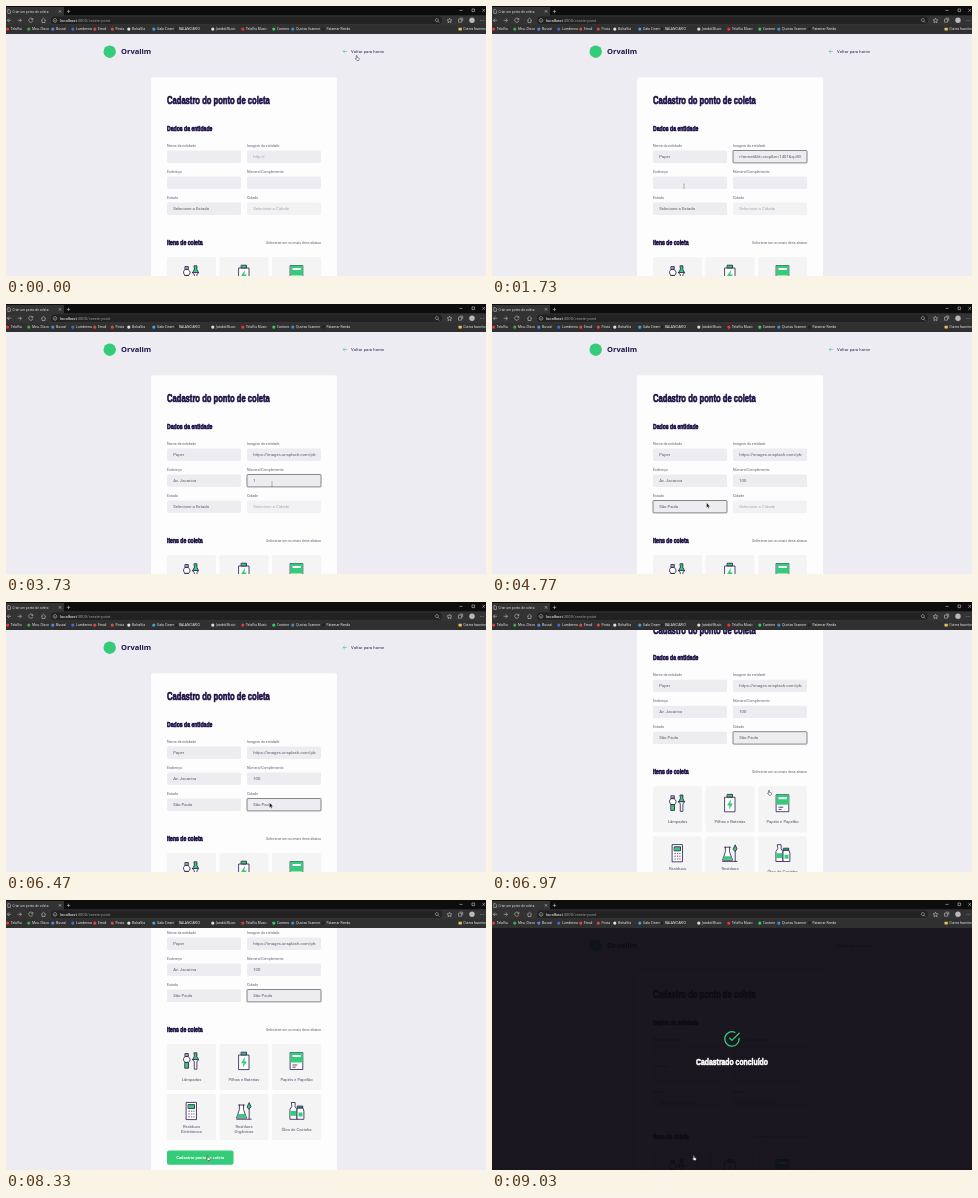
Recreate the animation shown at these times as an HTML page. Size 480 px wide and 270 px high, loop 9.06 s.

```html
<!DOCTYPE html>
<html lang="pt-BR">
<head>
<meta charset="utf-8">
<title>Criar um ponto de coleta</title>
<style>
  html, body { margin: 0; width: 100%; height: 100%; overflow: hidden; background: #ececf2; }
  svg { display: block; width: 100vw; height: 100vh; }
  text { font-family: Roboto, "Liberation Sans", sans-serif; white-space: pre; }
  .head { font-family: "Liberation Sans", Arial, sans-serif; font-weight: 700; stroke-width: .7; stroke-linejoin: round; }
  .brand { font-family: "Open Sans", "Noto Sans", sans-serif; font-weight: 700; }
  .ui { font-family: "Open Sans", "Noto Sans", sans-serif; font-weight: 500; }
  .line { fill: none; stroke: #c0c0c0; stroke-width: .6; }
  .ink { stroke: #261747; stroke-width: .8; stroke-linejoin: round; stroke-linecap: round; fill: none; }
  .green { fill: #34cb79; }
  .pale { fill: #fff; }
</style>
</head>
<body>
<svg id="stage" viewBox="0 0 480 270" preserveAspectRatio="none">
  <rect width="480" height="270" fill="#ececf2"/>
  <g id="page"></g>
  <g id="done">
    <rect y="27" width="480" height="243" fill="#0e0a14" opacity=".945"/>
    <g transform="translate(231.3 130.3) scale(.72)" fill="none" stroke="#34cb79" stroke-width="1.8" stroke-linecap="round" stroke-linejoin="round">
      <path d="M22 11.1V12a10 10 0 1 1-5.93-9.14"/>
      <path d="M22 4L12 14 9 11"/>
    </g>
  </g>
  <g id="chrome"></g>
  <g id="cursor"></g>
</svg>
<script>
const LOOP = 9060, SCROLL = 107, SENT = 8600;
const NAVY = "#1f1147";
const NS = "http://www.w3.org/2000/svg";
const $ = id => document.getElementById(id);

function add(parent, tag, attrs, content) {
  const el = document.createElementNS(NS, tag);
  for (const k in attrs) el.setAttribute(k, attrs[k]);
  if (content) el.textContent = content;
  parent.append(el);
  return el;
}
const rect = (p, x, y, width, height, fill, rx = 0) =>
  add(p, "rect", { x, y, width, height, fill, rx });
const dot = (p, cx, cy, r, fill) => add(p, "circle", { cx, cy, r, fill });
const line = (p, d) => add(p, "path", { d, class: "line" });
const label = (p, str, x, y, size, fill, more = {}) =>
  add(p, "text", { x, y, "font-size": size, fill, ...more }, str);

// Condensed display face: one fixed narrowing for every heading.
const heading = (p, str, x, y, size, fill, anchor = "start") =>
  add(p, "text", {
    class: "head", transform: `translate(${x} ${y}) scale(.7 1)`,
    "font-size": size, fill, stroke: fill, "text-anchor": anchor
  }, str);

// Browser frame
function buildChrome(p) {
  rect(p, 0, 0, 480, 28, "#303030");
  rect(p, 0, 0, 480, 9.5, "#0d0d0d");
  rect(p, 0, 1, 58, 9, "#333");
  rect(p, 0, 9.5, 480, 9.5, "#333");
  rect(p, 45, 10.6, 391, 7.4, "#222", 3.6);
  line(p, "M1.8 3.6h1.6l1 1v2.8H1.8z");
  label(p, "Criar um ponto de coleta", 6.5, 6.7, 3.1, "#eee", { class: "ui" });
  line(p, "M52.8 4.2l2.4 2.4m0-2.4l-2.4 2.4M60.8 5.4h3.4m-1.7-1.7v3.4");
  line(p, "M453.5 4.4h3M466 3h2.6v2.6H466zM476.3 3l2.7 2.7m0-2.7l-2.7 2.7");
  line(p, "M5.2 14.3H1.4m1.7-1.8l-1.8 1.8 1.8 1.8");
  line(p, "M11.6 14.3h3.8m-1.7-1.8l1.8 1.8-1.8 1.8");
  line(p, "M26.6 13a2.1 2.1 0 1 0 .3 1.6m0-2.6v1.5h-1.5");
  line(p, "M35.2 14.4l2.3-2.1 2.3 2.1m-3.8-.5v2.6h3v-2.6");
  line(p, "M49 12.6a1.8 1.8 0 1 0 .01 0M49 14v1.4");
  const url = label(p, "", 54, 15.9, 4.1, "#999");
  add(url, "tspan", { fill: "#fff" }, "localhost");
  add(url, "tspan", {}, ":3000/create-point");
  line(p, "M430.8 12.6a1.5 1.5 0 1 0 .01 0M431.9 15.2l1.4 1.4");
  line(p, "M443.5 12.2l.7 1.5 1.7.2-1.3 1.1.4 1.7-1.5-.9-1.5.9.4-1.7-1.3-1.1 1.7-.2z");
  line(p, "M452.5 13.2h3v3h-3zM453.7 12.1h3v3");
  dot(p, 466, 14.3, 2.7, "#b9b9b9");
  for (const x of [474.3, 476, 477.7]) dot(p, x, 14.3, .4, "#bbb");

  const marks = [
    ["TelaViu", 4.8, "#e33"], ["Meu. Disco", 26, "#3da65a"], ["Buscaí", 50, "#4f86ea"],
    ["Lumbrena", 70, "#3b6fd4"], ["Email", 92, "#d64b3f"], ["Posta", 109.5, "#d64b3f"],
    ["BolsaVia", 126, "#dfe5ea"], ["Gala Cinema", 151, "#35a7dd"], ["BALANCIARIO", 173, "#222"],
    ["Jatobá Music", 210, "#ddd"], ["TelaViu Music", 240, "#e33"], ["Cantoro", 271, "#2fce62"],
    ["Quotas Scanner", 290, "#3d8bc9"], ["Patamar Renda", 320.5, "#222"]
  ];
  for (const [name, x, color] of marks) {
    dot(p, x - 3.2, 23.1, 1.6, color);
    label(p, name, x, 24.3, 3.3, "#fff", { class: "ui" });
  }
  rect(p, 452.5, 21.8, 3.3, 2.6, "#e5c15c", .3);
  label(p, "Outros favoritos", 457.3, 24.3, 3.1, "#fff", { class: "ui" });
}

// Form page
const fields = [
  ["name", "Nome da entidade", 161, 144.5],
  ["image", "Imagem da entidade", 241, 144.5],
  ["street", "Endereço", 161, 170.5],
  ["number", "Número/Complemento", 241, 170.5],
  ["state", "Estado", 161, 196.5],
  ["city", "Cidade", 241, 196.5]
];
const ui = {};

function buildField(p, defs, [id, title, x, y]) {
  label(p, title, x, y - 3.7, 3.57, "#5c5c70");
  const box = rect(p, x, y, 74, 12.4, "#ececf1", 1.6);
  const clip = add(defs, "clipPath", { id: "clip-" + id });
  rect(clip, x + 6, y, 62.5, 12.4);
  const g = add(p, "g", { "clip-path": `url(#clip-${id})` });
  ui[id] = { box, x, text: label(g, "", x + 6.2, y + 7.8, 4.25) };
}

const icons = [
  `<path class="ink" d="M-6.2-7.5h3v3h-3zM-5.8-6h2.2"/>
   <path class="ink pale" d="M-6.2-4.5h3l1.8 2.5q.2 2.6-1.8 3.4h-3Q-8.2.6-8-2z"/>
   <path class="ink green" d="M-6.4 1.4h3.4v5.8h-3.4z"/>
   <path class="ink green" d="M2.8-8.2h2.6v3.6L7-1.4H1.2l1.6-3.2z"/>
   <path class="ink pale" d="M1.2-1.4H7L5.4.8v7.4H2.8V.8z"/>`,
  `<path class="ink pale" d="M-5-6H5V8.6H-5z"/><path class="ink green" d="M-2.5-8.8h5V-6h-5z"/>
   <path class="green" d="M1-4.2L-3 2.2h2.5L-1.2 6.6 3 .4H.4z"/>`,
  `<path class="ink pale" d="M-6-8.5H6.3V8.5H-6z"/><path class="green" d="M-6-8.5H6.3V1.5H-6z"/>
   <path class="pale" d="M-4-6H4.3v2H-4z"/><path class="ink" d="M-3.6 4h4M-3.6 6.2h2.4"/>`,
  `<path class="ink pale" d="M-5-8.6H5V8.6H-5z"/><path class="ink green" d="M-3-6.4h6v4h-6z"/>
   <path class="ink" d="M-2.7.2h.6M0 .2h.4M2.3.2h.4M-2.7 3h.6M0 3h.4M2.3 3h.4M-2.7 5.8h.6M0 5.8h.4M2.3 5.8h.4"/>`,
  `<path class="ink pale" d="M-4.6-6v4.4L-7.4 7H2.5L-.5-1.6V-6M-5.5-6H.4"/><path class="green" d="M-6 3h7l1 3.6h-9z"/>
   <path class="ink green" d="M3.2-4.3L5.2-8.4 7-4.3 5.2-2z"/><path class="ink" d="M5.2-2v10M-7.4 8.2h14.6"/>`,
  `<path class="ink pale" d="M-4.8-8.5h3.4v4l1.8 3v9.8h-7V-1.5l1.8-3z"/><path class="green" d="M-6.2 0h6.3v4.8h-6.3z"/>
   <path class="ink green" d="M1.2-5h5v2h-5z"/><path class="ink pale" d="M1-2.8h5.6L7.4 0v8.3H.5V0z"/><path class="green" d="M2 1.5h4v4H2z"/>`
];
const items = [["Lâmpadas"], ["Pilhas e Baterias"], ["Papéis e Papelão"],
  ["Resíduos", "Eletrônicos"], ["Resíduos", "Orgânicos"], ["Óleo de Cozinha"]];

function buildPage(p) {
  const defs = add(p, "defs", {});
  dot(p, 103.7, 45.7, 6.2, "#34cb79");
  label(p, "Orvalim", 115, 48.2, 7.5, NAVY, { class: "brand" });
  label(p, "Voltar para home", 345, 46.8, 4.2, "#322153", { "letter-spacing": .08 });
  add(p, "path", { d: "M340.8 45.5h-3.6m1.6-1.7l-1.7 1.7 1.7 1.7", fill: "none", stroke: "#34cb79", "stroke-width": .6 });
  rect(p, 145, 71.2, 186, 330, "#fdfdfd", 2);
  heading(p, "Cadastro do ponto de coleta", 161, 98.4, 10.9, NAVY);
  heading(p, "Dados da entidade", 161, 125, 7.3, NAVY);
  for (const f of fields) buildField(p, defs, f);
  ui.focus = add(p, "rect", { width: 74, height: 12.4, rx: .8, fill: "none", stroke: "#4a4a50", "stroke-width": .65 });

  heading(p, "Itens de coleta", 161, 239, 7.3, NAVY);
  label(p, "Selecione um ou mais itens abaixo", 315, 237.6, 3.57, "#5c5c70", { "text-anchor": "end" });
  items.forEach((words, i) => {
    const x = 161 + i % 3 * 52.5, y = 251 + Math.floor(i / 3) * 50;
    rect(p, x, y, 49, 46, "#f4f4f5", 2);
    add(p, "g", { transform: `translate(${x + 24.5} ${y + 17})` }).innerHTML = icons[i];
    words.forEach((w, row) => {
      const up = words.length > 1 ? 2.7 : 0;
      label(p, w, x + 24.5, y + 36.7 - up + row * 5.4, 4.2, "#55506a", { "text-anchor": "middle" });
    });
  });
  rect(p, 161, 357.4, 66.5, 14.4, "#34cb79", 2);
  label(p, "Cadastrar ponto de coleta", 194.2, 366, 4.15, "#fff", { "font-weight": 700, "text-anchor": "middle" });
}

// Timeline
const focusAt = [[0, null], [320, "name"], [1250, "image"], [1850, "street"],
  [3300, "number"], [4150, "state"], [5250, "city"]];
const pathAt = [
  [0, 351, 52, "hand"], [320, 200, 152, "beam"], [950, 200, 152, "beam"], [1250, 275, 152, "beam"],
  [1500, 275, 152, "beam"], [1730, 192, 180, "beam"], [2950, 192, 180, "beam"], [3300, 266, 180, "beam"],
  [3950, 266, 180, "beam"], [4150, 215, 203, "arrow"], [4770, 215, 201, "arrow"], [5200, 264, 203, "arrow"],
  [6470, 264, 203, "arrow"], [7050, 278, 190, "hand"], [7500, 278, 190, "hand"], [8250, 202, 258, "hand"],
  [LOOP, 202, 258, "hand"]
];
const shapes = {
  arrow: '<path d="M-.5-2.2v5l1.2-1 .8 1.6.8-.4-.8-1.6h1.5z" fill="#111" stroke="#fff" stroke-width=".35"/>',
  hand: '<path d="M-.7-2.2q.7-.6 1 .2v1.6l1.7.5q.5.4.1 1.7l-.5.8H0L-1.7.7q0-.8 1-.2z" fill="#fff" stroke="#222" stroke-width=".5"/>',
  beam: '<path d="M-.7-2h1.4M0-2v4M-.7 2H.7" fill="none" stroke="#666" stroke-width=".4"/>'
};

const ease = u => u * u * (3 - 2 * u);
const span = (t, a, b) => Math.min(1, Math.max(0, (t - a) / (b - a)));
const typed = (str, t, a, b) => str.slice(0, Math.floor(span(t, a, b) * str.length));
const latest = (rows, t) => rows.filter(r => r[0] <= t).pop();

function setField(id, value, hint = "") {
  const { text } = ui[id];
  text.textContent = value || hint;
  text.setAttribute("fill", value || id === "state" ? "#5a5a68" : "#a4a4b0");
}

function drawCursor(t) {
  const a = latest(pathAt, t), b = pathAt[pathAt.indexOf(a) + 1] || a;
  const u = a === b ? 0 : ease(span(t, a[0], b[0]));
  const x = a[1] + (b[1] - a[1]) * u, y = a[2] + (b[2] - a[2]) * u;
  const kind = u > .6 ? b[3] : a[3];
  const c = $("cursor");
  if (c.dataset.kind !== kind) {
    c.dataset.kind = kind;
    c.innerHTML = shapes[kind];
  }
  c.setAttribute("transform", `translate(${x} ${y})`);
}

function drawForm(t) {
  const focus = latest(focusAt, t)[1];
  setField("name", typed("Paper", t, 450, 900));
  setField("street", typed("Av. Jacarina", t, 1950, 2850));
  setField("number", typed("100", t, 3450, 4000));
  setField("state", t >= 4650 ? "São Paulo" : "", "Selecione a Estado");
  setField("city", t >= 6150 ? "São Paulo" : "", "Selecione a Cidade");
  ui.city.box.setAttribute("fill", t >= 4850 ? "#ececf1" : "#f2f2f5");

  const pasted = t >= 1450, atEnd = pasted && focus === "image";
  const image = ui.image.text;
  setField("image", !pasted ? "" : atEnd ? "o-format&fit=crop&w=1401&q=80" : "https://images.unsplash.com/photo-", "http://");
  image.setAttribute("x", ui.image.x + (atEnd ? 68 : 6.2));
  image.setAttribute("text-anchor", atEnd ? "end" : "start");

  ui.focus.setAttribute("visibility", focus ? "visible" : "hidden");
  if (focus) {
    const f = fields.find(r => r[0] === focus);
    ui.focus.setAttribute("x", f[2]);
    ui.focus.setAttribute("y", f[3]);
  }

  const shift = SCROLL * ease(span(t, 6650, 7200));
  $("page").setAttribute("transform", `translate(0 ${-shift})`);
}

function draw(t) {
  drawForm(t < SENT ? t : 0); // sending clears the form and returns to the top
  $("done").setAttribute("opacity", span(t, SENT - 40, SENT + 80));
  drawCursor(t);
}

buildPage($("page"));
buildChrome($("chrome"));
heading($("done"), "Cadastrado concluído", 240, 164.5, 9.8, "#fff", "middle");

const start = performance.now();
function tick() {
  draw((performance.now() - start) % LOOP);
  requestAnimationFrame(tick);
}
tick();
</script>
</body>
</html>
```
